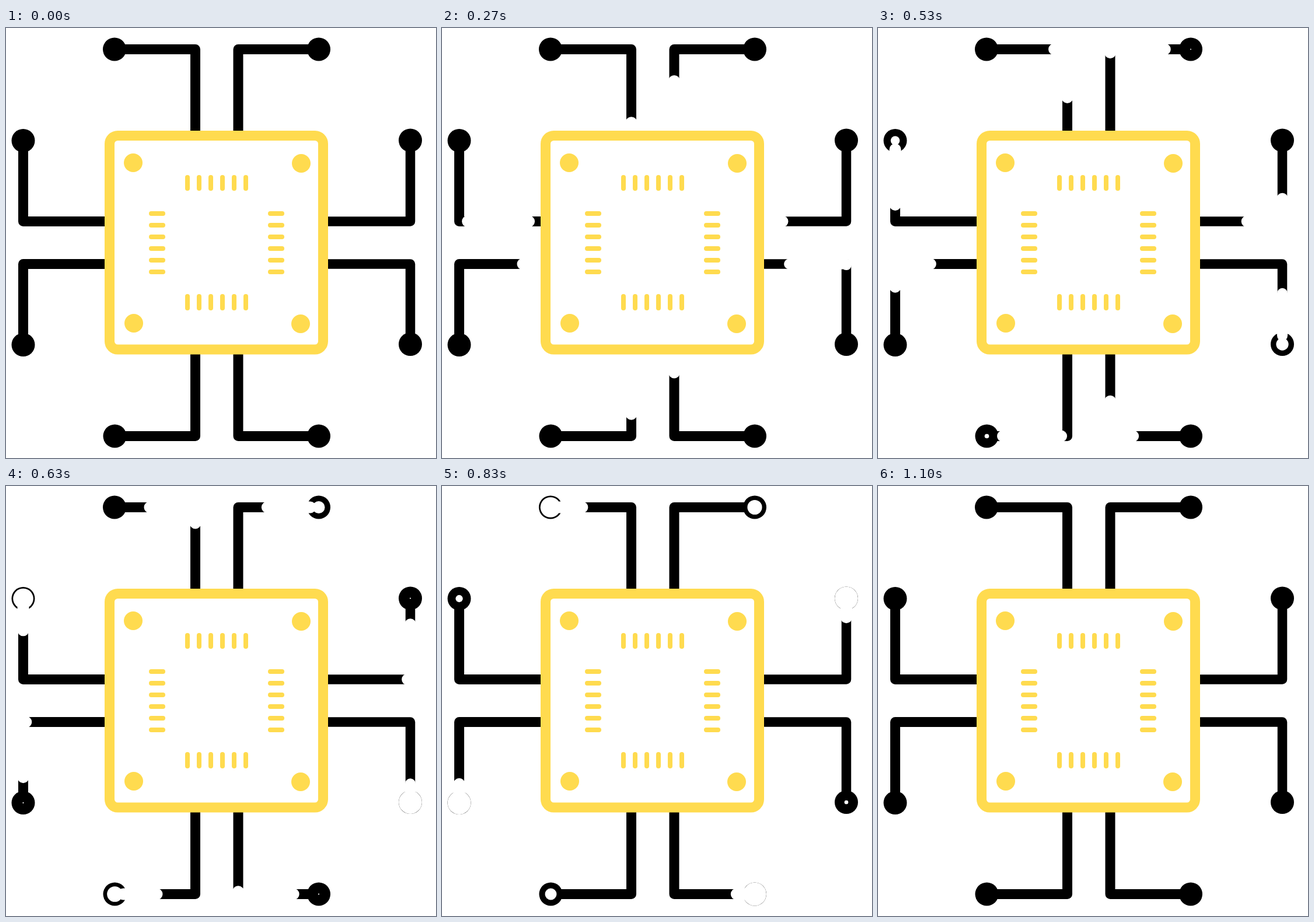
Write an HTML page with a canvas that moves like this. It is 737 px wide and 737 px high and loops after 1.13 s.

```html
<!DOCTYPE html>
<html lang="en">
<head>
<meta charset="utf-8">
<title>Chip pulses</title>
<style>
  html, body { margin: 0; width: 100%; height: 100%; overflow: hidden; background: #fff; }
  canvas { display: block; }
</style>
</head>
<body>
<canvas id="stage" width="737" height="737"></canvas>
<script>
const ctx = document.getElementById('stage').getContext('2d');
const LOOP = 1130, STEP = 100 / 3;
const SPEED = 18.52;            // pixels per step
const REACH = 264;              // pulses stop at the rim of the pad
const YELLOW = '#ffdb4f';

// pts: chip edge, corner, pad. start: step at which the pulse leaves the chip.
const tracks = [
  { pts: [[324.5, 177], [324.5, 36.5], [186, 36.5]], start: 7.2, len: 105 },
  { pts: [[398, 177], [398, 36.5], [536, 36.5]], start: 3.35, len: 99.5 },
  { pts: [[170, 331.5], [29.5, 331.5], [29.5, 193]], start: 1.2, len: 105 },
  { pts: [[170, 404.5], [29.5, 404.5], [29.5, 543]], start: 6.3, len: 99.5 },
  { pts: [[552, 331.5], [693, 331.5], [693, 192.5]], start: 6.3, len: 99 },
  { pts: [[552, 404.5], [693, 404.5], [693, 542]], start: 0.3, len: 99.5, width: 18 },
  { pts: [[324.5, 559], [324.5, 699.5], [186.5, 699.5]], start: 2.45, len: 100 },
  { pts: [[398, 559], [398, 699.5], [536, 699.5]], start: 6.3, len: 99 }
];

function line(pts, width, color) {
  ctx.beginPath();
  pts.forEach(([x, y]) => ctx.lineTo(x, y));
  ctx.lineWidth = width;
  ctx.strokeStyle = color;
  ctx.stroke();
}

function disc(x, y, r, color) {
  ctx.beginPath();
  ctx.arc(x, y, r, 0, 2 * Math.PI);
  ctx.fillStyle = color;
  ctx.fill();
}

// Radius of the white hole: opens evenly, then closes.
function holeRadius(age) {
  const up = age / 6.3, down = (age - 6.3) / 7.1;
  if (up <= 0 || down >= 1) return 0;
  return 20 * (up < 1 ? up : 1 - down ** 1.15);
}

function drawTrack({ pts, start, len, width = 20 }, step) {
  const [x, y] = pts[2];
  ctx.lineCap = 'butt';
  line(pts, x > 600 ? 16.5 : 17, '#000');
  disc(x, y, 20, '#000');

  const front = (step - start) * SPEED;
  const head = Math.min(front, REACH), tail = Math.max(front - len, 0);
  if (head > tail) {
    ctx.lineCap = 'round';
    ctx.setLineDash([head - tail, 999]);
    ctx.lineDashOffset = -tail;
    line(pts, width, '#fff');
    ctx.setLineDash([]);
  }
  const r = holeRadius(step - start - 12.35);
  if (r > 0) disc(x, y, r, '#fff');
}

function drawChip() {
  ctx.beginPath();
  ctx.roundRect(177.5, 184.5, 366, 366.5, 14);
  ctx.fillStyle = '#fff';
  ctx.fill();
  ctx.lineWidth = 17;
  ctx.strokeStyle = YELLOW;
  ctx.stroke();

  for (const [x, y] of [[218, 231], [506, 232], [219, 506], [505, 507]]) disc(x, y, 16, YELLOW);

  ctx.lineCap = 'round';
  for (let i = 0; i < 6; i++) {
    const x = 311 + 20 * i, y = 318 + 20 * i;
    line([[x, 256], [x, 275]], 8, YELLOW);
    line([[x, 460], [x, 480]], 8, YELLOW);
    line([[249, y], [269, y]], 8, YELLOW);
    line([[453, y], [473, y]], 8, YELLOW);
  }
}

function draw(ms) {
  const step = Math.floor((ms % LOOP + 3.35) / STEP);
  ctx.fillStyle = '#fff';
  ctx.fillRect(0, 0, 737, 737);
  ctx.lineJoin = 'round';
  tracks.forEach(track => drawTrack(track, step));
  drawChip();
}

let begin;
function tick(now) {
  begin ??= now;
  draw(now - begin);
  requestAnimationFrame(tick);
}
draw(0);
requestAnimationFrame(tick);
</script>
</body>
</html>
```
